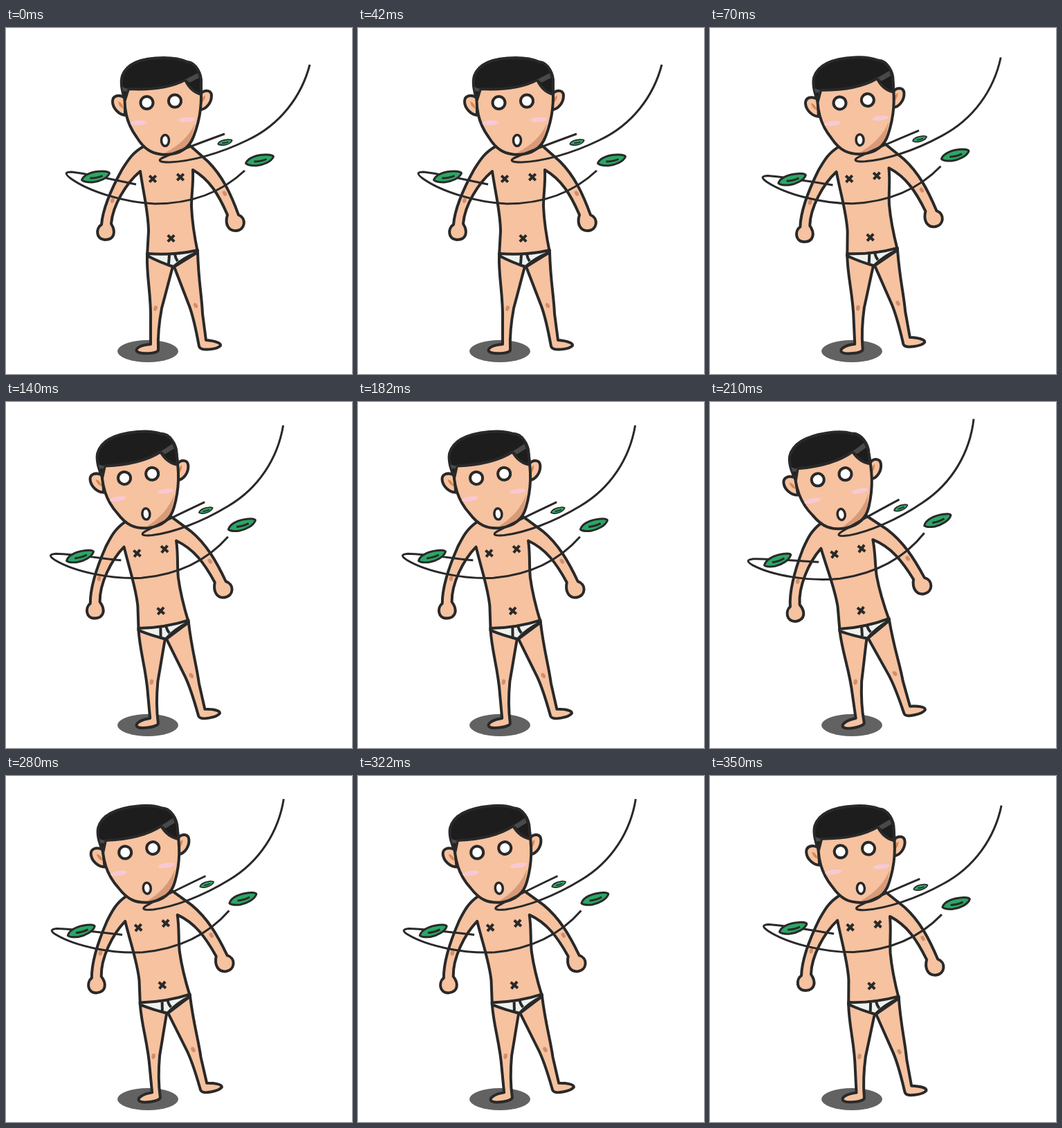
An HTML page with a canvas for the animation above (420 ms loop, 500 by 500 pixels).

```html
<!DOCTYPE html>
<html>
<head>
<meta charset="utf-8">
<style>
html, body { margin: 0; width: 100%; height: 100%; overflow: hidden; background: #fff; }
canvas { display: block; width: 500px; height: 500px; }
</style>
</head>
<body>
<canvas id="stage" width="500" height="500"></canvas>
<script>
const ctx = document.getElementById('stage').getContext('2d');
const INK = '#292929', SKIN = '#f6c2a0', SHADE = '#d89a78', MARK = '#d08f6c',
      PINK = '#f8c9d3', GREEN = '#2ba765', HAIR = '#1d1d1d', GLOSS = '#494949';
const STEP = 70;
const PIVOT = [205, 466];

// Tilt in degrees and foot drift in pixels; each pose is held for one step.
const POSES = [
  [0, 0, 0], [2.67, 0.7, 0], [5.2, 0, 0.3],
  [8.15, 3, 0.5], [5.5, 3, 0.7], [2.85, 3, 0.8]
];

const path = d => new Path2D(d);

const body = path(`M199 171 C183 180 177 190 168 204 C153 231 140 260 138 284
  C130 289 129 305 143 306 C157 306 159 294 152 283 C154 256 174 224 194 207
  C199 241 206 268 206 294 L204 329 L277 324 C272 300 269 282 268 258 C268 238 271 226 270 205
  C294 219 307 240 320 270 C316 283 321 293 332 293 C346 292 348 275 336 270
  C325 240 313 214 292 193 L265 169 Z`);
const leftLeg = path(`M204 329 C203 360 210 386 209 423 L209 457
  C194 458 187 463 189 467 C193 472 220 471 220 465 C219 440 222 421 225 405
  C231 383 236 363 241 345 Z`);
const rightLeg = path(`M277 324 C278 365 283 387 284 413 L289 451
  C301 452 311 455 310 459 C306 464 281 468 279 460 C276 444 272 421 265 402
  L243 345 Z`);
const pants = path('M204 326 C229 328 255 326 277 321 L277 324 Q256 332 242 345 Q223 339 204 329 Z');
const pantSeams = path('M236 328 L235 341 M244 327 Q245 333 248 337');

const ears = [
  path('M172 101 C163 95 154 98 154 106 C154 116 163 125 172 126 Z'),
  path('M281 95 C288 88 297 90 297 98 C297 108 289 118 280 118 Z')
];
const earFolds = [
  path('M162 106 Q169 108 170 117 Q163 114 162 106 Z'),
  path('M288 97 Q288 105 281 110 Q281 101 288 97 Z')
];
const face = path(`M173 78 C168 117 175 139 189 158 C200 176 212 183 232 183
  C253 182 265 173 271 157 C281 131 284 108 281 72 Z`);
const chin = path('M273 138 C264 158 247 172 228 181 Q257 183 267 164 Z');
const hair = path(`M172 104 C168 94 165 79 168 69 C175 50 199 43 228 43
  C242 43 253 45 262 49 C275 50 283 67 282 80 L282 96
  C271 93 264 86 259 75 C240 85 214 90 177 88 Z`);
const gloss = path('M260 74 L277 65 L279 72 L265 79 Z M168 85 L176 88 L174 92 L169 91 Z');

const swirls = path(`M439 53 C427 99 396 140 349 162 C308 182 266 193 236 194
  C221 194 217 191 230 186 C253 176 283 165 316 153
  M345 206 C309 240 265 254 215 254 C170 252 119 236 93 217
  C84 210 86 208 95 208 C120 211 153 219 188 226`);
const leaf = path('M-20 4.5 C-17 -4 -3 -8 9 -8 C15 -8 20 -7 20 -5 C17 2 6 7 -5 8 C-12 8 -18 7 -20 4.5 Z');
const vein = path('M-8 2 Q2 2 10 -1.5');

function fill(p, color) {
  ctx.fillStyle = color;
  ctx.fill(p);
}

function line(p, width = 4) {
  ctx.lineWidth = width;
  ctx.strokeStyle = INK;
  ctx.stroke(p);
}

function shape(p, color, width) {
  fill(p, color);
  line(p, width);
}

function oval(x, y, rx, ry, tilt = 0) {
  const p = new Path2D();
  p.ellipse(x, y, rx, ry, tilt, 0, Math.PI * 2);
  return p;
}

function cross(x, y) {
  line(path(`M${x - 4.7} ${y - 4.7} l9.4 9.4 m0 -9.4 l-9.4 9.4`));
}

function drawLeaf(x, y, scale, width) {
  ctx.save();
  ctx.translate(x, y);
  ctx.scale(scale, scale);
  shape(leaf, GREEN, width / scale);
  line(vein, width / scale);
  ctx.restore();
}

function drawBody() {
  shape(leftLeg, SKIN);
  shape(rightLeg, SKIN);
  shape(body, SKIN);
  shape(pants, '#eef2ef');
  line(pantSeams);
  for (const [x, y, tilt] of [[154, 249, 0.3], [316, 239, -0.5], [216, 405, 0.3], [274, 401, -0.5]])
    fill(oval(x, y, 2.7, 4, tilt), MARK);
  cross(212, 218);
  cross(252, 215.5);
  cross(238.5, 304);
}

function drawHead() {
  ears.forEach(e => shape(e, SKIN));
  earFolds.forEach(e => fill(e, '#d58a56'));
  fill(face, SKIN);
  fill(chin, SHADE);
  line(face);
  shape(hair, HAIR);
  fill(gloss, GLOSS);
  fill(oval(191.5, 137, 12, 3.5, -0.06), PINK);
  fill(oval(261, 132.5, 12, 3.5, -0.06), PINK);
  shape(oval(203.5, 108, 9, 9), '#fff');
  shape(oval(244, 105.5, 9, 9), '#fff');
  shape(oval(230, 162.5, 5.5, 8), '#fff', 3.5);
}

function draw(time) {
  const [tilt, dx, dy] = POSES[Math.floor(time / STEP) % POSES.length];
  ctx.clearRect(0, 0, 500, 500);
  fill(oval(205, 467, 44, 16), '#626262');
  ctx.save();
  ctx.translate(PIVOT[0] + dx, PIVOT[1] + dy);
  ctx.rotate(-tilt * Math.PI / 180);
  ctx.translate(-PIVOT[0], -PIVOT[1]);
  drawBody();
  drawHead();
  line(swirls, 3);
  drawLeaf(129.5, 215, 1, 3);
  drawLeaf(366.5, 191, 1, 3);
  drawLeaf(316.5, 165.3, 0.51, 1.7);
  ctx.restore();
}

ctx.lineJoin = 'round';
const start = performance.now();
function tick() {
  draw(performance.now() - start);
  requestAnimationFrame(tick);
}
tick();
</script>
</body>
</html>
```
